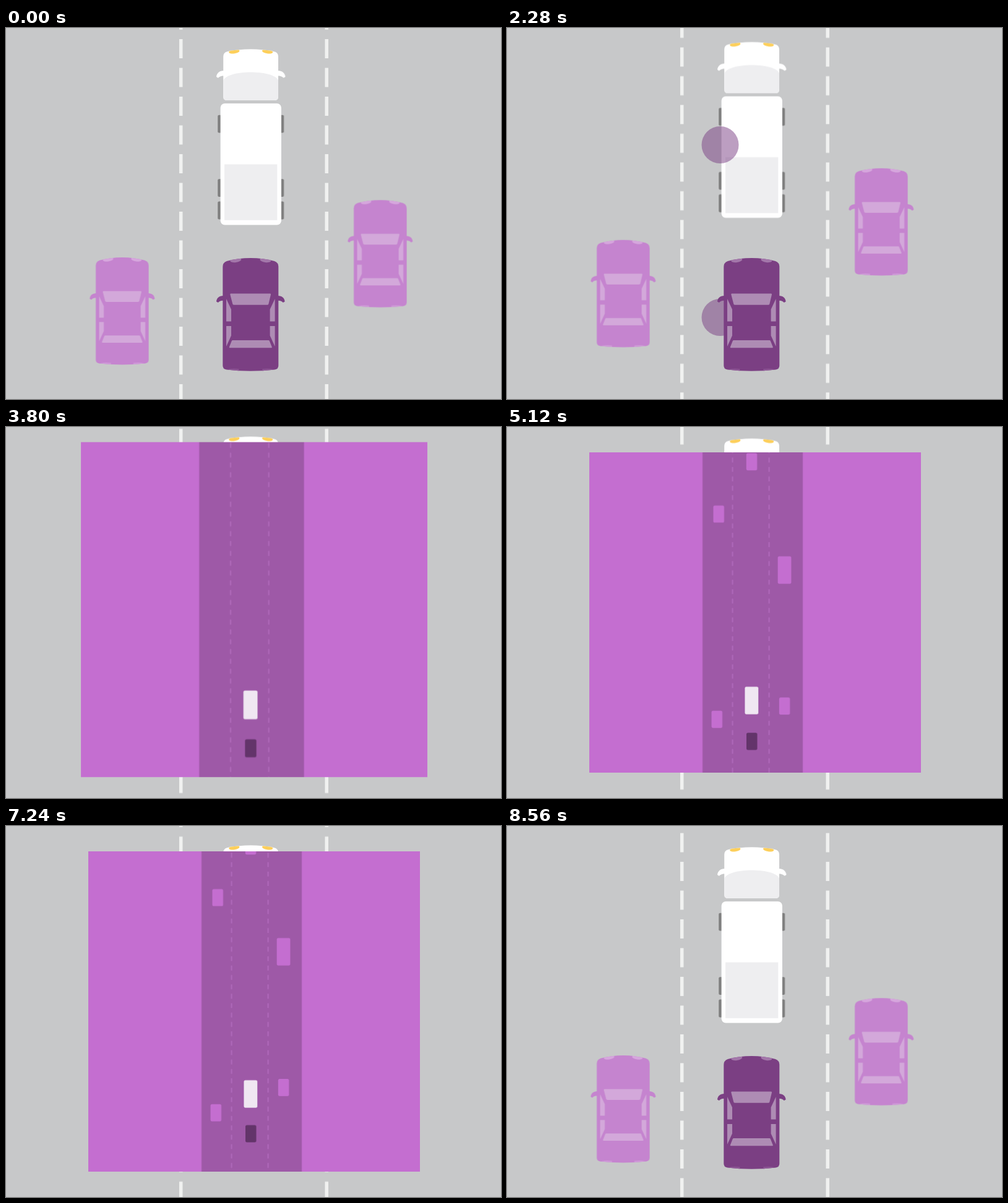
These frames come from a looping animation (800x600 px, 8600 ms). An HTML page:

```html
<!DOCTYPE html>
<html lang="en">
<head>
<meta charset="utf-8">
<title>Convoy</title>
<style>
  html, body { margin: 0; width: 100%; height: 100%; overflow: hidden; background: #c7c8c9; }
  svg { display: block; width: 100vw; height: 100vh; }

  .run, .hop, .truck, .left, .right, .dot, .panel, .flow, .drift, .others {
    animation: 8600ms cubic-bezier(.333, 0, .667, 1) infinite;
  }

  /* Road markings: steady run, reset every 1368 ms */
  .run { animation-name: run; animation-timing-function: linear; }
  .hop { animation-name: hop; animation-timing-function: step-end; }
  @keyframes run { to { transform: translateY(1021.25px); } }
  @keyframes hop {
    0% { transform: translateY(0); }
    15.907% { transform: translateY(-162.45px); }
    31.814% { transform: translateY(-324.9px); }
    47.721% { transform: translateY(-487.35px); }
    63.628% { transform: translateY(-649.8px); }
    79.535% { transform: translateY(-812.25px); }
    95.442%, 100% { transform: translateY(-974.7px); }
  }

  .truck { animation-name: truck; }
  .left { animation-name: left; }
  .right { animation-name: right; }
  @keyframes truck {
    0%, 97.2%, 100% { transform: translateY(0); }
    46.05% { transform: translateY(-18.8px); }
  }
  @keyframes left {
    0%, 93%, 100% { transform: translateY(0); }
    34.88%, 58% { transform: translateY(-33px); }
  }
  @keyframes right {
    0%, 8.37%, 93%, 100% { transform: translateY(0); }
    43.26%, 58% { transform: translateY(-97px); }
  }

  .dot { animation-name: dot; transform-box: fill-box; transform-origin: center; }
  @keyframes dot {
    0%, 20.93%, 40.47%, 100% { transform: scale(0); }
    25.1%, 37.2% { transform: scale(1); }
  }

  /* Map panel */
  .panel { animation-name: panel; transform-origin: 400px 414px; }
  @keyframes panel {
    0%, 40.47%, 98.6%, 100% { transform: scale(0); }
    44.65%, 94.88% { transform: scale(1.08); }
    47.44%, 92.56% { transform: scale(1); }
  }
  .flow { animation-name: drift; animation-timing-function: linear; --d: 345px; }
  .drift { animation-name: drift; animation-timing-function: linear; }
  @keyframes drift { to { transform: translateY(var(--d)); } }
  .others { animation-name: others; }
  @keyframes others {
    0%, 47.67% { opacity: 0; }
    53.5%, 100% { opacity: 1; }
  }

  .own { --body: #7b3f83; --glass: #ae8cb4; --lamp: #a377aa; --tail: #8d5695; }
  .other { --body: #c584cf; --glass: #d3a8da; --lamp: #d6a6dd; --tail: #cf9ad8; }
  .body { fill: var(--body); }
  .glass { fill: var(--glass); }
  .lamp { fill: var(--lamp); }
  .tail { fill: var(--tail); }
</style>
</head>
<body>
<svg viewBox="0 0 800 600" preserveAspectRatio="none">
  <defs>
    <path id="mirror" d="M-44 61C-51 61-55 65-55.3 70.5L-52.5 72C-50 69.5-48 68.8-44 68.8Z"/>
    <path id="shell" d="M-45 14Q-45 7.5-38.5 5Q-20 0 0 0Q20 0 38.5 5Q45 7.5 45 14V174Q45 179.5 39 180.5Q20 182.7 0 182.7Q-20 182.7-39 180.5Q-45 179.5-45 174Z"/>
    <clipPath id="shellClip"><use href="#shell"/></clipPath>
    <g id="side">
      <path class="glass" d="M-39.3 66L-31.3 83V102.5H-39.3ZM-39.3 110H-31.3V125.5L-39.3 143Z"/>
      <g clip-path="url(#shellClip)">
        <ellipse class="lamp" cx="-24" cy="3.5" rx="9" ry="3.5" transform="rotate(-8 -24 3.5)"/>
        <path class="tail" d="M-37 182V180Q-28 178.2-19 179.6V184Z"/>
      </g>
    </g>
    <!-- Centred on x, nose at y = 0 -->
    <g id="car">
      <g class="body">
        <use href="#shell"/>
        <use href="#mirror"/>
        <use href="#mirror" transform="scale(-1 1)"/>
      </g>
      <path class="glass" d="M-32 57.4H31.6Q33 57.4 32.7 59L29 74.5Q28.4 75.7 27 75.7H-27Q-28.4 75.7-29 74.5L-33 59Q-33.4 57.4-32 57.4ZM-29 133H29Q30 133 30.5 134L34.5 144Q34.7 145.2 33.5 145.2H-33.5Q-34.7 145.2-34.5 144L-30.5 134Q-30 133-29 133Z"/>
      <use href="#side"/>
      <use href="#side" transform="scale(-1 1)"/>
    </g>

    <path id="cab" d="M351.2 46Q351.2 39.5 358 38Q376 34.3 395.6 34.3Q415 34.3 433 38Q440 39.5 440 46V111Q440 117 434 117H357Q351.2 117 351.2 111Z"/>
    <clipPath id="cabClip"><use href="#cab"/></clipPath>
    <g id="truckSide">
      <path fill="#fff" d="M352 69C345 69 340.5 73 340 79L342.8 80.8C345 78.5 348 77.4 352 77.2Z"/>
      <g fill="#808080">
        <rect x="342.2" y="140.8" width="8" height="28.8" rx="2"/>
        <rect x="342.2" y="244.2" width="8" height="28.8" rx="2"/>
        <rect x="342.2" y="280.6" width="8" height="28.8" rx="2"/>
      </g>
    </g>
    <ellipse id="beam" cx="368.8" cy="38" rx="8.7" ry="3.3" transform="rotate(-8 368.8 38)"/>
    <clipPath id="panelClip"><rect x="133.5" y="41.5" width="534.7" height="517.5"/></clipPath>
  </defs>

  <rect width="800" height="600" fill="#c7c8c9"/>

  <g class="run"><g class="hop">
    <path d="M282.7 -216.5V640M518.2 -216.5V640" stroke="#f0f1f0" stroke-width="5.5" stroke-dasharray="31 15.5"/>
  </g></g>

  <g class="truck">
    <use href="#truckSide"/>
    <use href="#truckSide" transform="translate(791.4) scale(-1 1)"/>
    <use href="#cab" fill="#fff"/>
    <g clip-path="url(#cabClip)">
      <path fill="#eeeef0" d="M351 86C354 66.500 437 66.500 440.500 86V118H351Z"/>
      <g fill="#fdcf5a">
        <use href="#beam"/>
        <use href="#beam" transform="translate(791.4) scale(-1 1)"/>
      </g>
    </g>
    <rect x="346.600" y="122" width="98.300" height="196.500" rx="7" fill="#fff"/>
    <rect x="353" y="220.500" width="85.300" height="90.300" fill="#eeeef0"/>
  </g>

  <g fill="#7b3f83" fill-opacity=".5">
    <circle class="dot" cx="344.500" cy="189" r="30"/>
    <circle class="dot" cx="344.500" cy="468" r="30"/>
  </g>

  <use class="own" href="#car" transform="translate(395.300 372)"/>
  <g class="left"><use class="other" href="#car" transform="translate(187.800 371) scale(.95)"/></g>
  <g class="right"><use class="other" href="#car" transform="translate(604.800 278.300) scale(.95)"/></g>

  <g class="panel"><g clip-path="url(#panelClip)">
    <rect x="133" y="41" width="536" height="519" fill="#c46ed0"/>
    <rect x="316" y="41" width="162" height="519" fill="#9e59a7"/>
    <path class="flow" d="M364.500 -308V600M423.500 -308V600" stroke="#ae68b8" stroke-width="2.300" stroke-dasharray="8 7.2"/>
    <g class="others" fill="#c46ed0">
      <rect class="drift" style="--d:-97.2px" x="386.700" y="100.200" width="17.500" height="27.700" rx="2.500"/>
      <rect class="drift" style="--d:-101.5px" x="333.400" y="187.400" width="17.500" height="27.700" rx="2.500"/>
      <rect class="drift" style="--d:-113.5px" x="437.600" y="276.600" width="21.800" height="44.600" rx="2.500"/>
      <rect class="drift" style="--d:-115.2px" x="439.800" y="506.100" width="17.500" height="27.700" rx="2.500"/>
      <rect class="drift" style="--d:-36.6px" x="330.500" y="480.800" width="17.500" height="27.700" rx="2.500"/>
    </g>
    <rect class="drift" style="--d:-36.3px" x="384.400" y="441.600" width="21.800" height="44.600" rx="2.500" fill="#f0e7f2"/>
    <rect class="drift" style="--d:-43.6px" x="386.900" y="520.500" width="17.500" height="27.700" rx="2.500" fill="#63346a"/>
  </g></g>
</svg>
</body>
</html>
```
